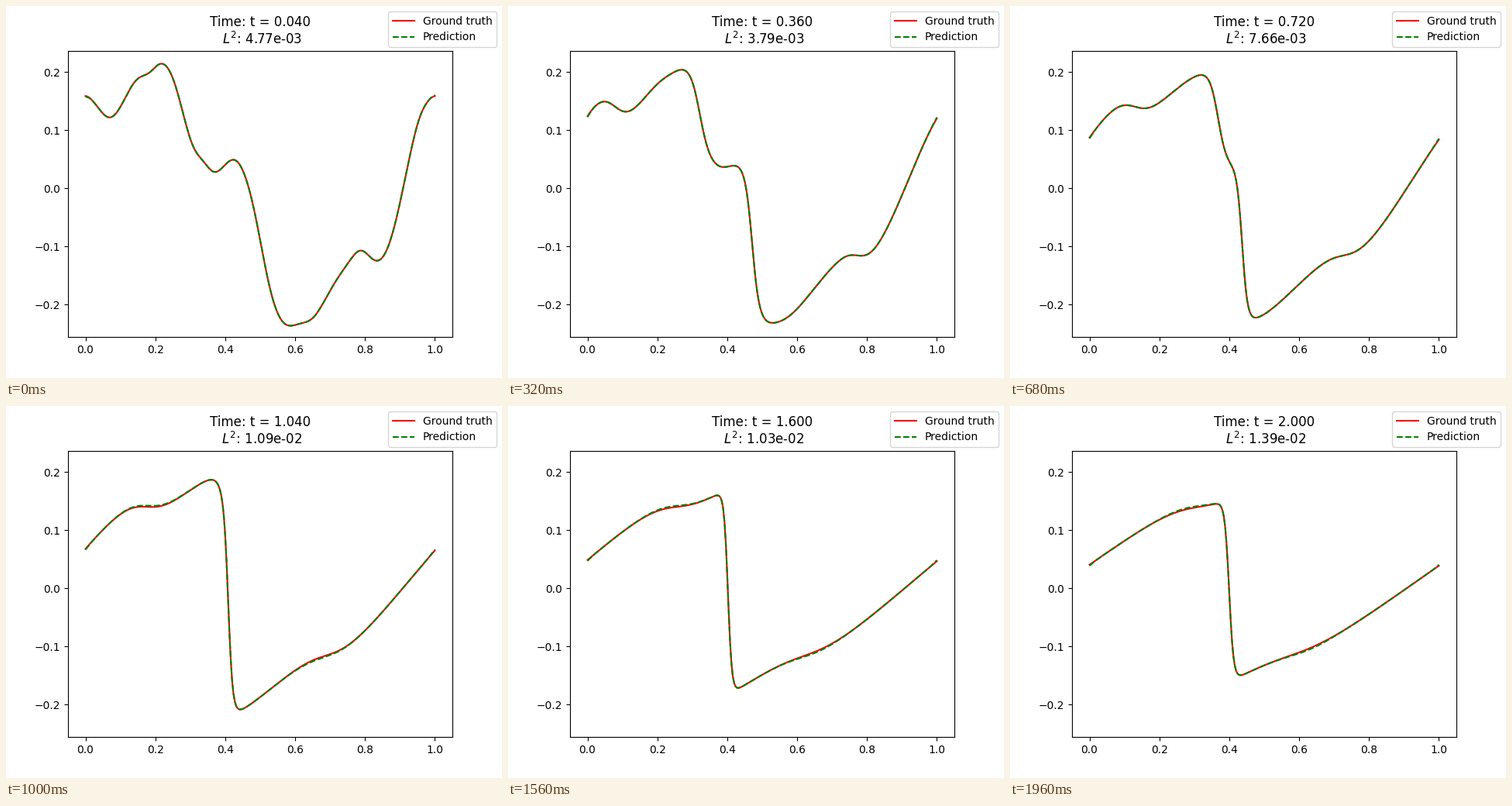
A matplotlib script for the animation above (2 s loop, 640 px wide and 480 px high).

```python
import numpy as np
import matplotlib.pyplot as plt
from matplotlib.animation import FuncAnimation

FRAMES = 50
DT = 0.04          # model time per frame
NU = 1e-3          # viscosity
N = 512            # solver grid
STRIDE = 2         # solver points per plotted point
SUBSTEPS = 20

# Peaks, dips and bends of the starting wave: x, u
KEYS = np.array([
    (0, .1587), (.0718, .122), (.1434, .185), (.1646, .1935), (.1844, .2),
    (.2132, .214), (.2529, .1827), (.3059, .0735), (.3347, .0473),
    (.3678, .028), (.4208, .049), (.4473, .032), (.4849, -.0493),
    (.5246, -.169), (.5555, -.224), (.6086, -.2335), (.6483, -.223),
    (.6969, -.1767), (.7544, -.1237), (.7831, -.1073), (.8295, -.1247),
    (.867, -.0933), (.9134, .0233), (.9488, .1147), (.9796, .152)])

# Relative error of the prediction: t, value
ERROR = np.array([(0.04, 4.77e-3), (0.36, 3.79e-3), (0.72, 7.66e-3),
                  (1.04, 1.09e-2), (1.36, 1.12e-2), (1.6, 1.03e-2),
                  (2.0, 1.39e-2)])

k = 2 * np.pi * np.arange(N // 2 + 1)
dealias = k < k[-1] * 2 / 3
h = DT / SUBSTEPS
half = np.exp(-NU * k**2 * h / 2)
full = half**2


def basis(x, modes=24):
    m = np.arange(1, modes + 1)
    a = 2 * np.pi * np.outer(x, m)
    return np.hstack([np.ones((len(x), 1)), np.cos(a) / m**2, np.sin(a) / m**2])


def start_wave():
    """Periodic curve of least bending through the key points."""
    coef = np.linalg.lstsq(basis(KEYS[:, 0]), KEYS[:, 1], rcond=None)[0]
    return basis(np.arange(N) / N) @ coef


def flux(v):
    u = np.fft.irfft(v, N)
    return -0.5j * k * dealias * np.fft.rfft(u * u)


def step(v):
    """One RK4 step of Burgers' equation with exact diffusion."""
    a = flux(v)
    b = flux(half * (v + h / 2 * a))
    c = flux(half * v + h / 2 * b)
    d = flux(full * v + h * half * c)
    return full * v + h / 6 * (full * a + 2 * half * (b + c) + d)


def solve():
    v = np.fft.rfft(start_wave())
    waves = []
    for _ in range(FRAMES):
        waves.append(np.fft.irfft(v, N)[::STRIDE])
        for _ in range(SUBSTEPS):
            v = step(v)
    return waves


def bump(center, width):
    return np.exp(-((x - center) / width)**2)


def predict(u, t):
    """The true wave plus a drift that grows once the shock forms."""
    late = max(t - 1, 0)
    grow = np.clip((t - 0.7) / 0.3, 0, 1)
    body = bump(0.18 + 0.1 * late, 0.07) - bump(0.67 - 0.04 * late, 0.07)
    ends = bump(1, 0.012) - bump(0, 0.012)
    return u + 0.002 * grow * body + 0.0015 * ends


waves = solve()
x = np.linspace(0, 1, N // STRIDE)

fig, ax = plt.subplots(figsize=(6.4, 4.8), dpi=100)
truth, = ax.plot(x, waves[0], "r", label="Ground truth")
guess, = ax.plot(x, waves[0], "g--", label="Prediction")
ax.set_xlim(-0.05, 1.05)
ax.set_ylim(-0.2561, 0.2367)
title = ax.set_title("")
fig.legend()


def update(i):
    t = DT * (i + 1)
    err = np.interp(t, *ERROR.T)
    truth.set_ydata(waves[i])
    guess.set_ydata(predict(waves[i], t))
    title.set_text(f"Time: t = {t:.3f}\n $L^2$: {err:.2e}")
    return truth, guess, title


anim = FuncAnimation(fig, update, frames=FRAMES, interval=1000 * DT,
                     repeat=True, repeat_delay=0)
plt.show()
```
